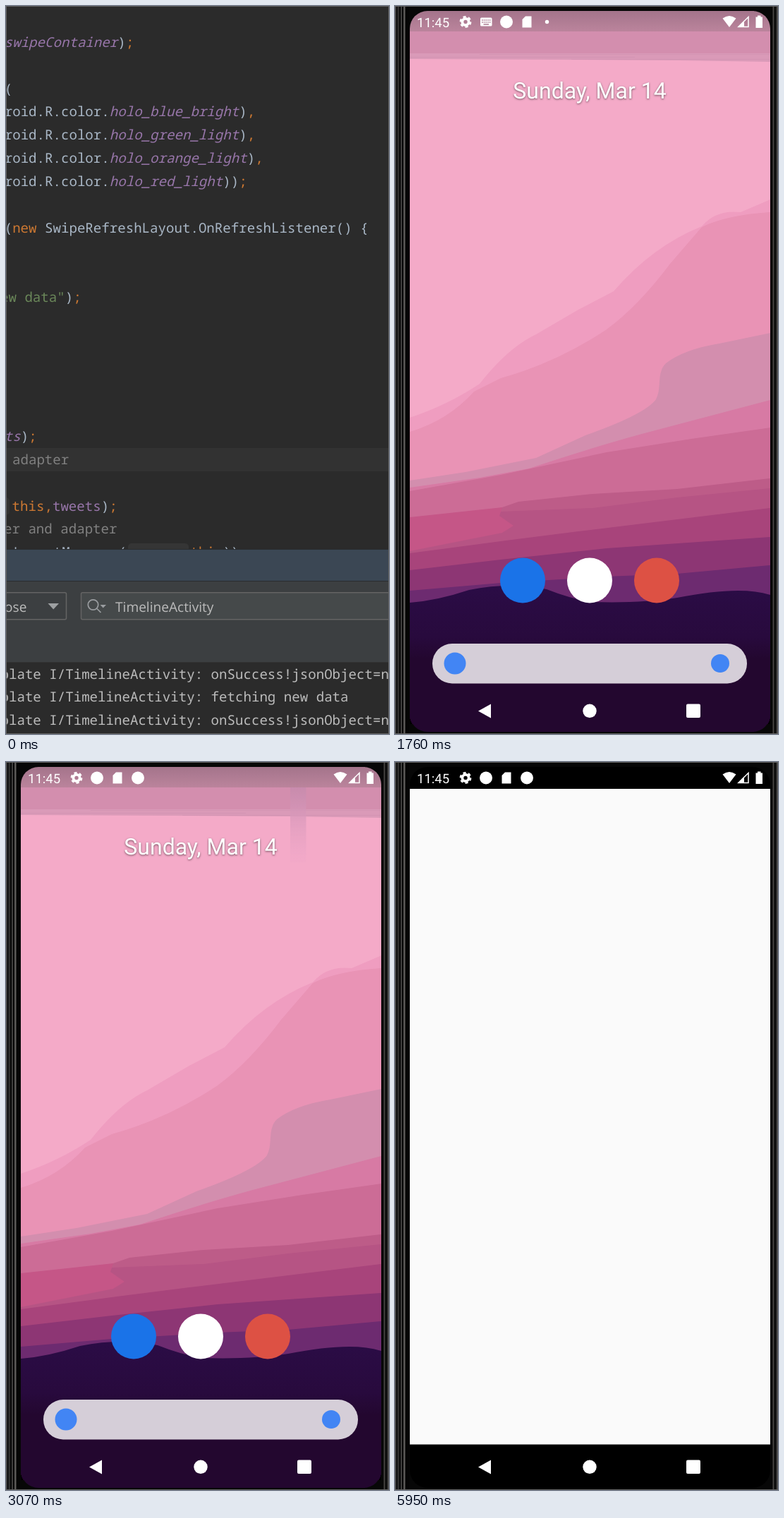
These frames come from a looping animation (543x1031 px, 8 s). An HTML page:

```html
<!DOCTYPE html>
<html lang="en">
<head>
<meta charset="utf-8">
<title>Code and phone</title>
<style>
html, body { margin: 0; width: 100%; height: 100%; overflow: hidden; background: #2b2b2b; }
svg { display: block; width: 100%; height: 100%; }
text { white-space: pre; text-rendering: geometricPrecision; }
.mono { font: 19.13px "Noto Sans Mono", monospace; fill: #a9b7c6; }
.ui { font: 19.1px "Open Sans", sans-serif; fill: #bbb; }
.phone { font-family: Roboto, sans-serif; fill: #fff; }
.field { fill: #9876aa; font-style: italic; }
.name { fill: #9876aa; }
.key { fill: #cc7832; }
.str { fill: #6a8759; }
.note { fill: #808080; }
.log { fill: #bbb; }
.hint { font: 16px "Open Sans", sans-serif; fill: #787878; }
</style>
</head>
<body>
<svg viewBox="0 0 543 1031">
<defs>
  <clipPath id="screen"><rect x="21" y="7" width="511" height="1021" rx="25"/></clipPath>
  <clipPath id="pane"><rect width="543" height="769"/></clipPath>
  <linearGradient id="shade" x2="0" y2="1">
    <stop stop-color="#a4748b"/><stop offset="1" stop-color="#bb849c"/>
  </linearGradient>
  <linearGradient id="ground" x2="0" y2="1">
    <stop stop-color="#2b0c46"/><stop offset=".35" stop-color="#280a3d"/><stop offset=".5" stop-color="#23072f"/>
  </linearGradient>
  <linearGradient id="streak" x2="0" y2="1">
    <stop stop-color="#c58bad"/><stop offset=".45" stop-color="#dc9bbd"/><stop offset="1" stop-color="#f0a8c9" stop-opacity=".5"/>
  </linearGradient>
  <path id="arrow" d="M.5.5V13l3-2.700 2 4.500 2-1-2-4.200h4z" fill="#fff" stroke="#000" stroke-width=".8"/>
  <circle id="badge" r="9" fill="#fff"/>
  <path id="card" d="M-2-8H6.500V8H-6.500V-3.500z" fill="#fff"/>
</defs>

<g data-show="0 1760">
  <rect width="543" height="1031" fill="#2b2b2b"/>
  <rect y="626" width="543" height="33" fill="#323232"/>
  <g clip-path="url(#pane)">
    <rect x="-10" y="696" width="15" height="25" rx="5" fill="#333"/>
    <rect x="173" y="761" width="86" height="25" rx="5" fill="#353535"/>
    <text class="hint" x="180" y="780">  context:</text>
    <g id="code"></g>
  </g>
  <rect y="769" width="543" height="46" fill="#3b4754"/>
  <path d="M0 769.500H543M0 814.500H543" stroke="#292c2f"/>
  <rect y="815" width="543" height="115" fill="#3c3f41"/>
  <path d="M0 929.500H543" stroke="#323232"/>
  <g stroke="#646464" stroke-width="1.500">
    <rect x="-9" y="830.700" width="94.500" height="38" rx="2" fill="#3c3f41"/>
    <rect x="106.500" y="830.700" width="450" height="38" rx="2" fill="#45494a"/>
  </g>
  <path d="M59.500 846H75L67.200 854.500z" fill="#9da0a2"/>
  <g stroke="#9a9da0" fill="none" stroke-width="1.700"><circle cx="123.500" cy="848" r="7.200"/><path d="M129 853.500L134.500 859"/></g>
  <path d="M133.500 848H142L137.700 852.500z" fill="#9a9da0"/>
  <text class="ui" x="-2" y="858">ose</text>
  <text class="ui" x="155" y="858">TimelineActivity</text>
  <g id="logs"></g>
  <path data-show="560 700" d="M520 472.500h2.500l1 1 1-1H527M523.500 473.500v11M520 485.500h2.500l1-1 1 1H527" fill="none" stroke="#ddd"/>
</g>

<g data-show="1760 8000">
  <rect width="543" height="1031" fill="#070707"/>
  <g id="rails"></g>
  <g clip-path="url(#screen)">
    <g data-show="1760 5950">
      <rect x="21" y="7" width="511" height="1022" fill="#f4aac8"/>
      <rect x="21" y="36" width="511" height="31" fill="#d38eae"/>
      <path d="M21 67H532V79L400 77 21 75z" fill="#da9ab8"/>
      <path d="M120 68.500H531M21 72.500H340M250 75.500H531" stroke="#cf91b0" opacity=".6"/>
      <rect x="21" y="7" width="511" height="29" fill="url(#shade)"/>
      <g id="hills"></g>
      <rect data-show="2810 5950" x="403" y="36" width="22.500" height="106" fill="url(#streak)" opacity=".75"/>
      <text class="phone" x="276" y="131" font-size="32" text-anchor="middle" style="text-shadow:0 1px 3px #0008">Sunday, Mar 14</text>
      <circle cx="181" cy="813.500" r="32" fill="#1a73e8"/>
      <circle cx="276" cy="813.500" r="32" fill="#fff"/>
      <circle cx="371" cy="813.500" r="32" fill="#dd5144"/>
      <rect x="53" y="903" width="446" height="56.500" rx="28" fill="#d5ced8"/>
      <circle cx="85" cy="931" r="15.500" fill="#4285f4"/>
      <circle cx="461" cy="931" r="13" fill="#4285f4"/>
    </g>
    <g data-show="5660 5780" opacity=".68">
      <rect x="46" y="57" width="460" height="922" fill="#000"/>
      <rect x="46" y="85" width="460" height="837.500" fill="#fafafa"/>
    </g>
    <g data-show="5780 5950">
      <rect x="24.500" y="14" width="503.500" height="1008" fill="#000"/>
      <rect x="24.500" y="45" width="503.500" height="915.500" fill="#fafafa"/>
    </g>
    <g data-show="5950 8000">
      <rect x="21" y="7" width="511" height="1022" fill="#000"/>
      <rect x="21" y="38" width="511" height="928.500" fill="#fafafa"/>
    </g>
  </g>

  <g fill="#fff">
    <text class="phone" x="31" y="29.500" font-size="18.500">11:45</text>
    <g transform="translate(100 22.500)" fill="none" stroke="#fff">
      <circle r="4.600" stroke-width="3.800"/><circle r="7" stroke-width="2.800" stroke-dasharray="4 3.330"/>
    </g>
    <g data-show="1760 1920">
      <rect x="121" y="16.500" width="16.500" height="12" rx="1.500"/>
      <path d="M123 20H136M123 23H136" stroke="#a9788f" stroke-width="1.600" stroke-dasharray="1.600 1.100"/>
      <path d="M125.500 26H133" stroke="#a9788f" stroke-width="1.500"/>
      <use href="#badge" x="158" y="22.500"/>
      <use href="#card" x="187" y="22.500"/>
    </g>
    <g data-show="1920 2070"><use href="#badge" x="130" y="22.500"/><use href="#card" x="159" y="22.500"/></g>
    <circle data-show="1760 2070" cx="215.500" cy="22.500" r="2.700"/>
    <g data-show="2070 8000">
      <use href="#badge" x="129" y="22.500"/><use href="#card" x="158" y="22.500"/><use href="#badge" x="187" y="22.500"/>
    </g>
    <path d="M464.500 17.500Q474 10.500 483.500 17.500L474 30z"/>
    <path d="M501 15.500V29.500H487z" fill="none" stroke="#fff" stroke-width="1.500"/>
    <path d="M485.500 30L495 20.500V30z"/>
    <path d="M514 13.500h4.500v2h2.500V31h-9.500V15.500h2.500z"/>
    <path d="M118 998.500L136 988.500V1008.500z"/>
    <circle cx="276" cy="998.300" r="9.700"/>
    <rect x="413" y="988.500" width="20" height="19.500" rx="2"/>
  </g>
  <use data-show="2500 2810" href="#arrow" x="403" y="130"/>
  <use data-show="2810 2930" href="#arrow" x="411" y="64"/>
  <use data-show="2930 3070" href="#arrow" x="417" y="0"/>
</g>
<rect x=".5" y=".5" width="542" height="1030" fill="none" stroke="#606060"/>
</svg>

<script>
const LOOP = 8000;
const find = id => document.getElementById(id);

function add(parent, tag, attrs, text) {
  const node = document.createElementNS(parent.namespaceURI, tag);
  for (const key in attrs) node.setAttribute(key, attrs[key]);
  if (text) node.textContent = text;
  return parent.appendChild(node);
}

// Parts are "class~text" or plain text, laid out as one run.
function line(parent, x, y, ...parts) {
  const row = add(parent, 'text', { class: 'mono', x, y });
  for (const part of parts) {
    const [, cls, text] = part.match(/^(?:(field|name|key|str|note|log)~)?(.*)$/);
    add(row, 'tspan', cls ? { class: cls } : {}, text);
  }
}

const code = (row, x, ...parts) => line(find('code'), x, 58 + 32.83 * row, ...parts);
code(0, -2.3, 'field~swipeContainer', ')', 'key~;');
code(2, -2.3, '(');
['blue_bright', 'green_light', 'orange_light'].forEach((color, i) =>
  code(3 + i, -2.3, 'roid.R.color.', 'field~holo_' + color, ')', 'key~,'));
code(6, -2.3, 'roid.R.color.', 'field~holo_red_light', '))', 'key~;');
code(8, -2.3, '(', 'key~new ', 'SwipeRefreshLayout.OnRefreshListener() {');
code(11, -8, 'str~ew data"', ')', 'key~;');
code(17, -2.3, 'field~ts', ')', 'key~;');
code(18, 9, 'note~adapter');
code(20, 8.6, 'key~this,', 'name~tweets', ')', 'key~;');
code(21, -3, 'note~er and adapter');
code(22, -12.5, 'arLayoutManager(');
code(22, 261.5, 'key~this', '))', 'key~;');

['onSuccess!jsonObject=n', 'fetching new data', 'onSuccess!jsonObject=n'].forEach((message, i) =>
  line(find('logs'), -7.5, 952.5 + 32.85 * i, 'log~plate I/TimelineActivity: ' + message));

// Vertical bands of the phone frame: x, width, color.
[[1, 3, '#191919'], [4, 2, '#2e2e2d'], [8, 2, '#3e3d3c'], [12, 2.5, '#5b5957'], [15, 5, '#050505'],
 [535.5, 2, '#454341'], [540, 2, '#2f2e2d']].forEach(([x, width, fill]) =>
  add(find('rails'), 'rect', { x, y: 1, width, height: 1029, fill }));

// Upper edge of each wallpaper layer, painted back to front.
[
  ['#ef9dc0', '21 583 Q75 565 120 535 Q160 484 200 465 L260 430 310 404 Q365 340 435 312 Q455 288 490 292 L532 274'],
  ['#e993b5', '21 603 Q75 587 112 546 L150 527 Q230 505 300 458 Q345 425 390 365 L435 313 Q470 296 532 292'],
  ['#d38eae', '21 672 L100 660 200 640 270 608 Q355 578 370 557 C379 540 370 520 384 506 Q410 486 460 478 L532 463'],
  ['#d77aa4', '21 682 L120 668 190 655 Q280 625 350 606 L532 558'],
  ['#cc6c96', '21 687 L150 664 300 632 420 613 532 597'],
  ['#bd5c88', '21 745 L152 710 175 702 280 691 400 684 532 669'],
  ['#b65484', '21 750 L150 716 280 711 400 696 532 683'],
  ['#a8447b', '21 775 L165 756 260 744 400 727 532 711'],
  ['#8d3674', '21 799 L150 784 300 768 532 752'],
  ['#6d2b70', '21 828 L150 817 300 808 400 804 532 792'],
  ['url(#ground)', '21 845 Q60 842 105 827 Q165 815 215 826 Q250 840 280 844 Q350 846 400 838 Q490 820 532 834']
].forEach(([fill, edge], i) => {
  const d = `M${edge}V1029H21z`;
  add(find('hills'), 'path', { d, fill });
  if (i === 6) add(find('hills'), 'path', { d: 'M21 724L152 710 148 722 168 736 152 746 21 772z', fill: '#c55687' });
});

// Each part is on from its first time up to its second.
document.querySelectorAll('[data-show]').forEach(node => {
  const [from, to] = node.dataset.show.split(' ').map(Number);
  const key = (time, opacity) => ({ offset: time / LOOP, opacity, easing: 'steps(1, end)' });
  const keys = [key(from, node.getAttribute('opacity') || 1), key(to, 0)];
  if (from > 0) keys.unshift(key(0, 0));
  if (to < LOOP) keys.push(key(LOOP, 0));
  node.animate(keys, { duration: LOOP, iterations: Infinity }).startTime = 0;
});
</script>
</body>
</html>
```
